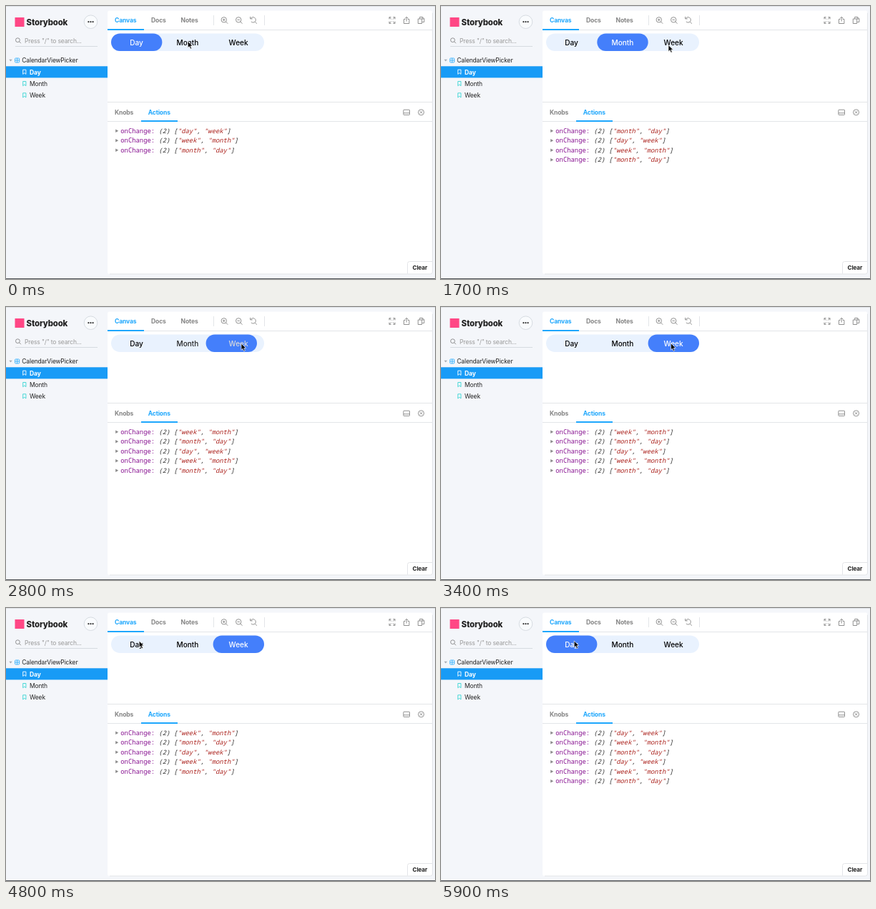
Write an HTML page that moves like this. It is 600 by 382 pixels and loops after 6000 ms.

```html
<!DOCTYPE html>
<html lang="en">
<head>
<meta charset="utf-8">
<title>Calendar view picker</title>
<style>
  html, body { margin: 0; width: 100%; height: 100%; overflow: hidden; background: #f4f6fa; }
  svg { display: block; width: 100vw; height: 100vh; }
  text { font: 8.5px Inter, "Open Sans", sans-serif; letter-spacing: -.15px; fill: #222; white-space: pre; }
  .tab { font-size: 8.6px; font-weight: 700; fill: #858585; }
  .on { fill: #1ea7fd; }
  .icon { fill: none; stroke: #858585; stroke-width: .9; }
  .line { fill: none; stroke: #e3e5e8; }
  .mark { fill: none; stroke: #37d5d3; stroke-width: .9; }
  #labels text { font-size: 10.1px; font-weight: 500; letter-spacing: 0; text-anchor: middle; }
  #log text { font: 8.85px "Noto Sans Mono", "Liberation Mono", monospace; letter-spacing: 0; fill: #333; }
  #log .key { fill: #881391; }
  #log .val { font-style: italic; }
  #log .str { fill: #ab211c; }
</style>
</head>
<body>
<svg viewBox="0 0 600 382" preserveAspectRatio="none">
  <defs><path id="bookmark" d="M0 0h4.2v6.2l-2.1-1.8l-2.1 1.8z"/></defs>
  <rect width="600" height="382" fill="#f4f6fa"/>

  <!-- sidebar -->
  <rect x="12.5" y="16" width="13" height="13" fill="#ff4785"/>
  <text x="28.6" y="26.6" style="font-size:11.4px;font-weight:800">Storybook</text>
  <circle cx="118.5" cy="22.2" r="9.3" fill="#f9fbfd" stroke="#cfd5db" stroke-width=".8"/>
  <path d="M115.4 22.2h0M118.5 22.2h0M121.6 22.2h0" stroke="#333" stroke-width="2.2" stroke-linecap="round"/>
  <g class="icon"><circle cx="16.4" cy="47.7" r="2.9"/><path d="M18.5 49.8l2.4 2.4"/></g>
  <text x="26" y="51.8" style="fill:#999">Press "/" to search...</text>
  <path class="line" d="M13 56.5H128" style="stroke:#d6dbe0"/>
  <path d="M4.3 74.8h4.4l-2.2 2.6z" fill="#a5abb2"/>
  <g fill="none" stroke="#1ea7fd" stroke-width=".8">
    <rect x="12.6" y="73" width="6" height="6" rx="1"/><path d="M15.6 73v6M12.6 76h6"/>
  </g>
  <text x="22.3" y="79.1">CalendarViewPicker</text>
  <rect y="84.3" width="142" height="16.1" fill="#189bf6"/>
  <use href="#bookmark" x="23.7" y="89.2" class="mark" style="stroke:#fff"/>
  <use href="#bookmark" x="23.7" y="105.5" class="mark"/>
  <use href="#bookmark" x="23.7" y="121.8" class="mark"/>
  <text x="33" y="95.6" style="fill:#fff;font-weight:700">Day</text>
  <text x="33" y="111.7">Month</text>
  <text x="33" y="128">Week</text>

  <!-- main panel -->
  <rect x="142" y="6.5" width="454.5" height="368.5" rx="3" fill="#fff"/>
  <path class="line" d="M596.5 9.5V372a3 3 0 0 1-3 3H145"/>
  <path class="line" d="M142 33.5H596M142 134.5H596M142 161.5H596M290.5 13V27M361.5 13V27"/>
  <path class="on" d="M142 32h51v2h-51zM189 160h51v2h-51z"/>
  <text class="tab on" x="152" y="23.1">Canvas</text>
  <text class="tab" x="203" y="23.1">Docs</text>
  <text class="tab" x="244.5" y="23.1">Notes</text>
  <text class="tab" x="152" y="151.8">Knobs</text>
  <text class="tab on" x="198.7" y="151.8">Actions</text>
  <g class="icon">
    <circle cx="304.8" cy="19.3" r="3.7"/><path d="M307.5 22l2.7 2.7M303 19.3h3.6M304.8 17.5v3.6"/>
    <circle cx="325.2" cy="19.3" r="3.7"/><path d="M327.9 22l2.7 2.7M323.4 19.3h3.6"/>
    <path d="M342.3 17.6a3.7 3.7 0 1 1 .6 4.3M341.7 14.9v3h3M348.2 22l2.7 2.7"/>
    <path d="M536 18.4v-2.7h2.7M541.3 15.7h2.7v2.7M544 21.6v2.7h-2.7M538.7 24.3h-2.7v-2.7M536 15.7l2.9 2.9M544 15.7l-2.9 2.9M544 24.3l-2.9-2.9M536 24.3l2.9-2.9"/>
    <path d="M558.5 18.5h-2v6h7.4v-6h-2M560.2 21.5v-6M558 17.4l2.2-2.2l2.2 2.2"/>
    <path d="M578.7 18v-2.6h3.8l2.4 2.4v4.6h-2.7M582.2 15.6v2.4h2.4M576.3 18h5.4v6.5h-5.4z"/>
    <rect x="555.9" y="145.2" width="8.6" height="7.2" rx=".7"/><path d="M556 149.8h8.4"/>
    <circle cx="580.6" cy="148.8" r="4"/><path d="M579 147.2l3.2 3.2M582.2 147.2l-3.2 3.2"/>
  </g>
  <path class="line" d="M561.5 374.5V360.5a3 3 0 0 1 3-3H596"/>
  <text x="578.8" y="369.2" text-anchor="middle" style="font-size:8.2px;font-weight:700">Clear</text>
  <path d="M0 381.5H600" stroke="#55585c"/>
  <path d="M0 .5H600" stroke="#dcdfe4"/>

  <!-- picker -->
  <rect x="147" y="38.5" width="214" height="24.5" rx="12.25" fill="#e9f2fe"/>
  <rect id="pill" y="38.5" width="71.4" height="24.5" rx="12.25" fill="#447ffb"/>
  <g id="labels">
    <text x="182.5" y="54.5">Day</text>
    <text x="253.9" y="54.5">Month</text>
    <text x="325.1" y="54.5">Week</text>
  </g>
  <g id="log"></g>
  <path id="cursor" d="M0 0V9.2L2.1 7.3L3.6 10.8L5.3 10.1L3.8 6.7H6.7Z" fill="#000" stroke="#fff" stroke-width=".7"/>
</svg>
<script>
const LOOP = 6000, SLIDE = 400, ROW = 13.5, MAX_ROWS = 6;
const $ = id => document.getElementById(id);
const pill = $('pill'), log = $('log'), cursor = $('cursor');
const labels = [...$('labels').children];

const clicks = [{ at: 694, to: 1 }, { at: 2575, to: 2 }, { at: 4885, to: 0 }];
// Cursor stops: time, x, y
const stops = [
  [0, 254.3, 49.3], [1300, 254.3, 49.3], [1700, 318, 54.5], [2200, 329, 51],
  [3300, 329, 51], [4000, 197, 47.3], [4400, 186.2, 46], [LOOP, 186.2, 46]
];

// Newest entry on top
const changes = [['day', 'week'], ['week', 'month'], ['month', 'day']];
for (let i = 0; i < MAX_ROWS; i++) {
  const [from, to] = changes[i % 3], y = 174.7 + i * ROW;
  const str = s => `<tspan class="str">"${s}"</tspan>`;
  log.innerHTML += `<g><path d="M153.2 ${y - 2.3}l4 2.3l-4 2.3z" fill="#8a8a8a"/>` +
    `<text x="160.3" y="${y + 3}"><tspan class="key">onChange:</tspan> ` +
    `<tspan class="val">(2) [${str(from)}, ${str(to)}]</tspan></text></g>`;
}
const rows = [...log.children];

// CSS "ease" curve, solved by bisection
function ease(x) {
  if (x <= 0 || x >= 1) return x <= 0 ? 0 : 1;
  let lo = 0, hi = 1, s;
  for (let i = 0; i < 24; i++) {
    s = (lo + hi) / 2;
    if (.75 * s * (1 - s) + s ** 3 < x) lo = s; else hi = s;
  }
  return .3 * s * (1 - s) ** 2 + 3 * s * s * (1 - s) + s ** 3;
}

const mix = (a, b, p) => a + (b - a) * p;

function draw(t) {
  const done = clicks.filter(c => t >= c.at);
  const last = done.at(-1) || { at: -SLIDE, to: 0 };
  const from = done.length > 1 ? done.at(-2).to : 0;
  const p = ease((t - last.at) / SLIDE);
  pill.setAttribute('x', 147 + 71.3 * mix(from, last.to, p));

  labels.forEach((label, i) => {
    const lit = i === last.to ? p : i === from ? 1 - p : 0;
    const v = Math.round(255 * lit);
    label.style.fill = `rgb(${v},${v},${v})`;
  });

  const hidden = MAX_ROWS - 3 - done.length;
  rows.forEach((row, i) => row.style.display = i < hidden ? 'none' : '');
  log.setAttribute('transform', `translate(0 ${-hidden * ROW})`);

  const k = stops.findIndex(s => s[0] > t);
  const [t0, x0, y0] = stops[k - 1], [t1, x1, y1] = stops[k];
  const u = (t - t0) / (t1 - t0), q = u * u * (3 - 2 * u);
  cursor.setAttribute('transform', `translate(${mix(x0, x1, q)} ${mix(y0, y1, q)})`);
}

const start = performance.now();
function tick() {
  draw((performance.now() - start) % LOOP);
  requestAnimationFrame(tick);
}
tick();
</script>
</body>
</html>
```
